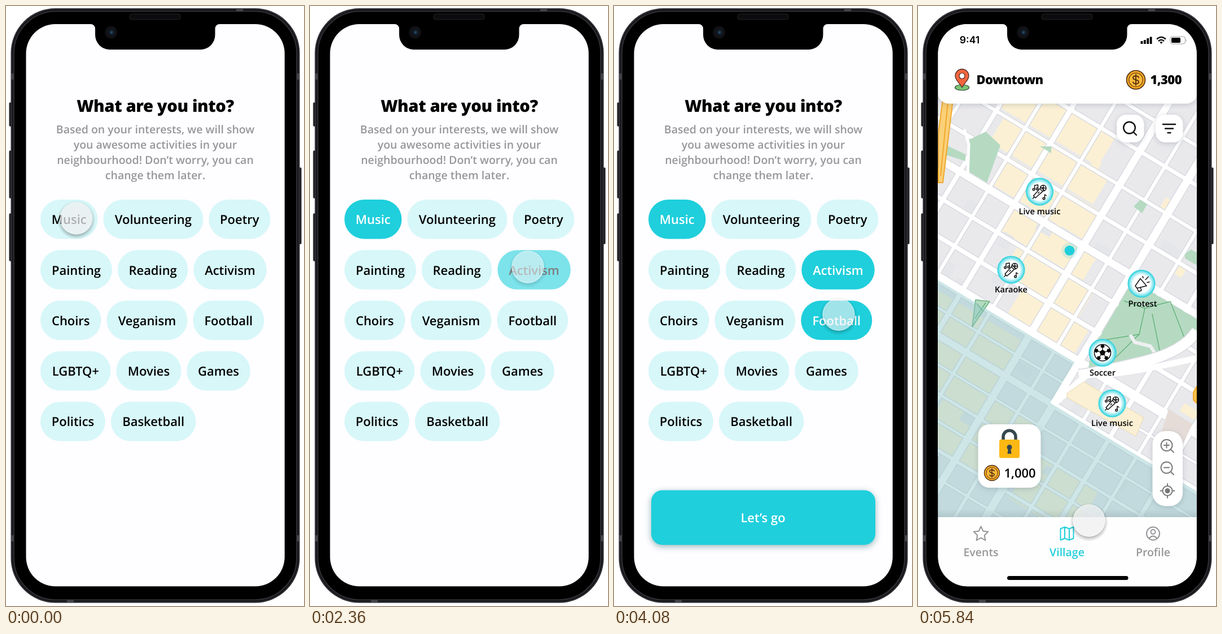
Recreate the animation shown at these times as an HTML page. Size 528 px wide and 1060 px high, loop 5880 ms.

```html
<!DOCTYPE html>
<html lang="en">
<head>
<meta charset="utf-8">
<title>Interests</title>
<style>
html, body { margin: 0; width: 100%; height: 100%; overflow: hidden; background: #fff; }
svg { display: block; width: 528px; height: 1060px; }
text { font-family: "Open Sans", sans-serif; font-weight: 600; font-size: 21.94px; text-rendering: geometricPrecision; }
.mid { text-anchor: middle; }
.title { font-weight: 800; font-size: 29.25px; letter-spacing: -.4px; }
.bold { font-weight: 800; letter-spacing: -.025em; }
.note { font-size: 19.5px; fill: #97979a; }
.tag { font-size: 14.63px; }
.clock { font: 600 17.5px Inter, sans-serif; }
.line { fill: none; stroke: #111; stroke-width: 1.5; stroke-linecap: round; stroke-linejoin: round; }
.card { fill: #fff; filter: drop-shadow(0 2px 5px rgba(60, 70, 90, .22)); }
</style>
</head>
<body>
<svg viewBox="0 0 528 1060" xmlns="http://www.w3.org/2000/svg">
  <defs>
    <clipPath id="screen"><rect x="35.500" y="32" width="458.200" height="993.300" rx="52"/></clipPath>
    <clipPath id="aroundTouch">
      <path clip-rule="evenodd" d="M-50-50H50V50H-50ZM-28.500 0a28.500 28.500 0 0 0 57 0a28.500 28.500 0 0 0-57 0Z"/>
    </clipPath>
    <radialGradient id="touchShade">
      <stop offset=".72" stop-opacity=".34"/>
      <stop offset=".86" stop-opacity=".14"/>
      <stop offset="1" stop-opacity="0"/>
    </radialGradient>
    <radialGradient id="ring">
      <stop offset=".62" stop-color="#fff"/>
      <stop offset=".84" stop-color="#8be6ed"/>
      <stop offset="1" stop-color="#1fcfdc"/>
    </radialGradient>
    <radialGradient id="lens">
      <stop offset="0" stop-color="#3c6c90"/>
      <stop offset=".35" stop-color="#14283a"/>
      <stop offset="1" stop-color="#101115"/>
    </radialGradient>
    <linearGradient id="lift" x1="0" y1="0" x2="0" y2="1">
      <stop offset="0" stop-color="#56646c" stop-opacity="0"/>
      <stop offset="1" stop-color="#56646c" stop-opacity=".16"/>
    </linearGradient>
    <g id="coin">
      <circle r="16.500" fill="#f8a823" stroke="#4a2c12" stroke-width="1.600"/>
      <circle r="12.200" fill="#fbbb3b" stroke="#6d3d10" stroke-width="1.300"/>
      <path class="line" style="stroke:#5d3410;stroke-width:2" d="M5-4C4-8-5-8-5-3.500C-5 1 5-1 5 3.500C5 8-4 8-5 4M0-9.500V9.500"/>
    </g>
    <g id="mic" class="line">
      <g transform="rotate(45)">
        <circle cy="-9" r="5.200"/><path d="M-5-7H5M-3.500-4L-2.500 13H2.500L3.500-4M0 1V4M0 13V17M-3-12L3-7M3-12L-3-7"/>
      </g>
      <path d="M-9-4V-11L-3-12V-5M9 12V5L12 7"/>
      <circle cx="-10.500" cy="-4" r="1.800"/><circle cx="-4.500" cy="-5" r="1.800"/><circle cx="7.500" cy="12" r="1.800"/>
    </g>
    <g id="horn" class="line">
      <path d="M-2-9L9 4L-8 8L-11 4ZM-8 8L-5 14L0 12L-2 7M3-10L2-13M7-7L12-12M10-2L14-3"/>
    </g>
    <g id="ball">
      <circle r="14.500" fill="#fff" stroke="#111" stroke-width="1.600"/>
      <g id="spots"></g>
    </g>
  </defs>

  <g id="body">
    <path fill="#202024" d="M5.500 172q0-2 5-2v43q-5 0-5-2zM5.500 257q0-2 5-2v85q-5 0-5-2zM5.500 368q0-2 5-2v85q-5 0-5-2zM523.500 287q0-2-5-2v136q5 0 5-2z"/>
    <rect x="9.500" y="5" width="510" height="1048.500" rx="78" fill="#17171a" stroke="#303036" stroke-width="2"/>
    <path fill="#45454a" d="M9 119h8v11H9zM512 119h8v11h-8zM9 935h8v11H9zM512 935h8v11h-8zM408 5h12v7h-12zM108 1046h12v8h-12z"/>
    <rect x="14" y="9.500" width="501" height="1039.500" rx="74" fill="#000" stroke="#35353b" stroke-width="1.600"/>
    <rect x="18" y="13" width="493.500" height="1032" rx="70" fill="#000"/>
    <rect x="35.500" y="32" width="458.200" height="993.300" rx="52" fill="#fefdff"/>
  </g>

  <g clip-path="url(#screen)">
    <g id="picker">
      <text class="mid title" x="264.500" y="186.500">What are you into?</text>
      <g id="go" opacity="0">
        <rect x="66" y="855.500" width="397" height="96.500" rx="19.500" fill="#1fcfdc" style="filter:drop-shadow(0 3px 6px rgba(15,95,105,.45))"/>
        <text class="mid" x="264" y="911.500" fill="#fff">Let’s go</text>
      </g>
    </g>

    <g id="home" opacity="0">
      <rect x="35" y="32" width="460" height="994" fill="#e9e9ec"/>
      <g id="streets" transform="translate(283 628) rotate(31)"></g>
      <g id="parks"></g>
      <path transform="translate(283 628) rotate(31)" d="M-600 4H-4V88H500V500H-600Z" fill="#8fc7c9" opacity=".44"/>
      <circle cx="268.500" cy="432" r="14" fill="#1fcfdc" opacity=".16"/>
      <circle cx="268.500" cy="432" r="8.800" fill="#1fcfdc"/>
      <g id="pins"></g>

      <rect class="card" x="35" y="0" width="460" height="172.500" rx="20"/>
      <text class="mid clock" x="91.500" y="66">9:41</text>
      <path d="M394.500 62h3.800v5h-3.800zM399.900 60h3.800v7h-3.800zM405.300 57h3.800v10h-3.800zM410.700 54.500h3.800v12.500h-3.800z"/>
      <path class="line" style="stroke-width:2.400;stroke-linecap:butt" d="M423 58.500q8-7 16 0M426 62q5-4.500 10 0"/>
      <path d="M428.500 64q2.500-2 5 0l-2.500 3z"/>
      <rect x="447" y="54" width="26.500" height="13" rx="4" fill="none" stroke="#999"/>
      <rect x="449" y="56" width="16" height="9" rx="2"/>
      <path d="M475 58.500q2 2 0 4z" fill="#999"/>

      <ellipse cx="78" cy="144" rx="12.500" ry="5" fill="#7cc576" stroke="#2d4a34" stroke-width="1.200"/>
      <path d="M78 144C73 135 66 131 66 123.500A12 12 0 0 1 90 123.500C90 131 83 135 78 144Z" fill="#f2643d" stroke="#4b2a24" stroke-width="1.300"/>
      <circle cx="78" cy="123.500" r="5" fill="#fff" stroke="#4b2a24" stroke-width="1.200"/>
      <text class="bold" x="103.500" y="138">Downtown</text>
      <use href="#coin" x="386" y="130.500"/>
      <text class="bold" x="411.500" y="138">1,300</text>

      <rect class="card" x="352" y="192" width="48.500" height="49" rx="17"/>
      <rect class="card" x="421" y="192" width="48.500" height="49" rx="17"/>
      <path class="line" style="stroke-width:2.400" d="M382 223L387 228M434 209H456M438 216.500H452M442.500 224H447.500"/>
      <circle class="line" style="stroke-width:2.400" cx="374.500" cy="215" r="10.300"/>

      <rect class="card" x="106.500" y="739" width="111" height="112" rx="20"/>
      <path d="M151 768V761A11 11 0 0 1 173 761V768" fill="none" stroke="#36474f" stroke-width="5.500"/>
      <rect x="144" y="766" width="36" height="32.500" rx="3" fill="#fdb813"/>
      <path d="M162 775a4.500 4.500 0 0 1 2.500 8.200l1 7.800h-7l1-7.800A4.500 4.500 0 0 1 162 775z" fill="#36474f"/>
      <use href="#coin" transform="translate(131 825) scale(.82)"/>
      <text x="152.500" y="833">1,000</text>

      <rect class="card" x="415.500" y="751" width="53.500" height="132.500" rx="23"/>
      <g class="line" style="stroke:#77777a;stroke-width:1.900">
        <path d="M436 776H445M440.500 771.500V780.500M447.500 783L453 788.500M436 815.500H445M447.500 822.500L453 828M442 844V848M442 865V869M429.500 856.500H433.500M450.500 856.500H454.500"/>
        <circle cx="440.500" cy="776" r="10"/><circle cx="440.500" cy="815.500" r="10"/><circle cx="442" cy="856.500" r="8.500"/>
        <circle cx="442" cy="856.500" r="3.600" fill="#77777a"/>
      </g>

      <rect x="35" y="889" width="460" height="14" fill="url(#lift)"/>
      <rect x="35" y="903" width="460" height="123" fill="#fefefe"/>
      <g class="line" style="stroke:#949498;stroke-width:2">
        <path id="star"/>
        <circle cx="416.500" cy="932" r="11.500"/><circle cx="416.500" cy="929" r="4"/><path d="M409.500 940.500Q416.500 932.500 423.500 940.500"/>
        <path style="stroke:#1fcfdc" d="M252.500 923.500L260 920.500L268 923.500L275.500 920.500V940.500L268 943.500L260 940.500L252.500 943.500ZM260 920.500V940.500M268 923.500V943.500"/>
      </g>
      <text class="mid note" x="111.500" y="972">Events</text>
      <text class="mid note" x="264" y="972" style="fill:#1fcfdc">Village</text>
      <text class="mid note" x="416.500" y="972">Profile</text>
      <rect x="158" y="1007" width="214.500" height="7" rx="3.500"/>
    </g>

    <g id="touch">
      <g id="rest">
        <g clip-path="url(#aroundTouch)"><circle cy="3" r="34" fill="url(#touchShade)"/></g>
        <circle r="28.500" fill="#efeff0" fill-opacity=".74"/>
        <circle r="28" fill="none" stroke="#fff" stroke-opacity=".55"/>
      </g>
      <circle id="press" r="28" fill="#fff" fill-opacity=".4" stroke="#fff" stroke-opacity=".75" stroke-width="1.400" opacity="0"/>
    </g>
  </g>

  <path d="M150 20V32A8 8 0 0 1 158 40V51A26 26 0 0 0 184 77H344.500A26 26 0 0 0 370.500 51V40A8 8 0 0 1 378.500 32V20Z"/>
  <rect x="219" y="14" width="90" height="10" rx="4" fill="#0c0c0e" stroke="#222226"/>
  <circle cx="186" cy="46.500" r="11" fill="#101115"/>
  <circle cx="187" cy="46.500" r="6.500" fill="url(#lens)"/>
</svg>
<script>
const LOOP = 5880, PALE = '#d7f7f9', TEAL = '#1fcfdc';
const $ = id => document.getElementById(id);

function add(parent, tag, attrs, text) {
  const el = document.createElementNS('http://www.w3.org/2000/svg', tag);
  for (const k in attrs) el.setAttribute(k, attrs[k]);
  if (text) el.textContent = text;
  parent.appendChild(el);
  return el;
}

// steps: [ms, value, easing towards the next step]
function play(el, prop, steps) {
  const all = [[0, steps[0][1]], ...steps, [LOOP, steps[steps.length - 1][1]]];
  el.animate(
    all.map(([ms, v, easing = 'linear']) => ({ offset: ms / LOOP, [prop]: v, easing })),
    { duration: LOOP, iterations: Infinity }
  );
}
const fade = (el, prop, start, from, to, ms = 300) =>
  play(el, prop, [[start, from, 'ease-out'], [start + ms, to]]);

// Interest picker
['Based on your interests, we will show', 'you awesome activities in your',
 'neighbourhood! Don’t worry, you can', 'change them later.'].forEach((s, i) =>
  add($('picker'), 'text', { class: 'mid note', x: 264.5, y: 225 + i * 27 }, s));

const chosen = { Music: 260, Activism: 2260, Football: 3740 };
const rows = [
  [['Music', 101.5], ['Volunteering', 177], ['Poetry', 109]],
  [['Painting', 127], ['Reading', 124.5], ['Activism', 129.5]],
  [['Choirs', 107.5], ['Veganism', 143], ['Football', 126]],
  [['LGBTQ+', 124.5], ['Movies', 115], ['Games', 112.5]],
  [['Politics', 115], ['Basketball', 150.5]]
];
rows.forEach((row, r) => {
  let x = 61;
  const y = 342 + r * 89.3;
  for (const [name, width] of row) {
    const box = add($('picker'), 'rect', { x, y, width, height: 69.5, rx: 34.75, fill: PALE });
    const label = add($('picker'), 'text', { class: 'mid', x: x + width / 2, y: y + 43.2 }, name);
    if (name in chosen) {
      fade(box, 'fill', chosen[name], PALE, TEAL);
      fade(label, 'fill', chosen[name], '#000', '#fff');
    }
    x += width + 9.9;
  }
});

// Street map, drawn on a turned grid
const map = $('streets');
const block = (x, y, width, height, fill = '#fbf0d3') => add(map, 'rect', { x, y, width, height, fill });
for (let k = 0; k < 6; k++) block(-150 - k * 46, -62 - k * 62, 138 + k * 19, 58);
block(-320, 20, 215, 150);
block(-170, 130, 160, 130);
block(20, 180, 130, 90);
let seed = 7;
const rnd = () => (seed = seed * 16807 % 2147483647) / 2147483647;
for (let i = 0; i < 30; i++)
  block(-420 + rnd() * 640, -430 + rnd() * 700, 14 + rnd() * 24, 12 + rnd() * 16, rnd() < .35 ? '#fbf0d3' : '#e5e6e9');

const along = [[-435, 6], [-375, 7], [-305, 6], [-242, 7], [-180, 13], [-122, 7], [-62, 8], [0, 17],
  [46, 4], [88, 12], [132, 4], [176, 5], [218, 4], [262, 6], [305, 4]];
const across = [[-415, 6], [-352, 8], [-292, 6], [-240, 9], [-178, 6], [-97, 13], [-45, 6], [2, 14],
  [62, 6], [118, 8], [176, 6], [236, 8]];
const road = (d, w, color) => add(map, 'path', { d, stroke: color, 'stroke-width': w, fill: 'none' });
for (const [extra, color] of [[3, '#d8dae0'], [0, '#fff']]) {
  for (const [y, w] of along) road(`M-600 ${y}H500`, w + extra, color);
  for (const [x, w] of across) road(`M${x}-600V450`, w + extra, color);
}

const shape = (d, fill, stroke = 'none', w = 1) =>
  add($('parks'), 'path', { d, fill, stroke, 'stroke-width': w, 'stroke-linejoin': 'round' });
const GREEN = '#b5dac1', LEAF = '#65b27b';
shape('M91 236L120 222L146 246L122 312L91 293Z', GREEN);
shape('M50 246L84 262V274L46 262Z', GREEN);
shape('M102 519L127 522L96 567Z', GREEN, LEAF, 1.5);
shape('M104 526L116 540M120 524L101 552', 'none', LEAF, 1.5);
shape('M382 354L394 342L406 350L397 366Z', GREEN);
shape('M216 248H236V260Z', GREEN);
shape('M473 438L484 430L494 436V458L473 446Z', GREEN);
shape('M351 535L372 500L408 502L494 553V574Q475 598 430 610L301 645L307 610Z', GREEN);
shape('M365 521L402 534L447 522M402 534L392 580L345 626M415 544L428 608M447 522L472 586M392 580L330 590', 'none', LEAF, 1.4);
shape('M376 581L384 594L412 601L420 614', 'none', '#eef0f1', 6);
shape('M285 652Q330 645 400 628T494 574', 'none', '#d6d8df', 21);
shape('M285 652Q330 645 400 628T494 574', 'none', '#fff', 18);
shape('M242 702L300 651Q350 655 494 622', 'none', '#fff', 11);
shape('M264 684L294 664L400 727L386 760L264 692Z', '#fbf0d3', '#e4d9b4', 1);
shape('M444 712L486 739L469 775L432 750Z', '#e5dcd8');
shape('M36 312V225L44 165H62L44 312Z', '#fbd078', '#f0a92e', 2);
shape('M40 300L53 170', 'none', '#f0a92e', 2);
shape('M494 672L488 682V696L494 702Z', '#fbc04f', '#f0a92e', 2);
shape('M82 218L90 244L88 300', 'none', '#fff', 5);

// Places
const spin = (n, r, turn = 0) => Array.from({ length: n }, (_, i) => {
  const a = (i / n) * 2 * Math.PI - Math.PI / 2 + turn;
  return [r * Math.cos(a), r * Math.sin(a)];
});
add($('spots'), 'polygon', { points: spin(5, 5.5).join(' ') });
spin(5, 12.5).forEach(([x, y], i) => {
  add($('spots'), 'path', { d: `M0 0L${x} ${y}`, stroke: '#111', 'stroke-width': 1.2 });
  add($('spots'), 'polygon', {
    points: spin(5, 3.8, Math.PI).join(' '),
    transform: `translate(${x * .92} ${y * .92}) rotate(${i * 72})`
  });
});

[['Live music', 215.5, 328, 'mic'], ['Karaoke', 165, 466, 'mic'], ['Protest', 396, 490.5, 'horn', 2],
 ['Soccer', 327, 612.5, 'ball'], ['Live music', 344, 702, 'mic']].forEach(([name, x, y, icon, shift = 0]) => {
  add($('pins'), 'circle', { cx: x, cy: y, r: 24.5, fill: 'url(#ring)' });
  add($('pins'), 'use', { href: '#' + icon, x, y });
  add($('pins'), 'text', { class: 'mid tag', x: x + shift, y: y + 40 }, name);
});

const tips = spin(5, 13.5), dips = spin(5, 6.5, Math.PI / 5);
$('star').setAttribute('d', 'M' + tips.flatMap((p, i) => [p, dips[i]])
  .map(([x, y]) => `${(x + 111.5).toFixed(1)} ${(y + 933).toFixed(1)}`).join('L') + 'Z');

// Motion
fade($('go'), 'opacity', 3740, 0, 1);
fade($('home'), 'opacity', 5430, 0, 1, 320);

const at = (x, y) => `translate(${x}px, ${y}px)`;
const glide = 'cubic-bezier(.45, 0, .3, 1)';
play($('touch'), 'transform', [
  [720, at(124.5, 375), glide], [1240, at(386, 461)],
  [3040, at(386, 461), glide], [3560, at(398, 545)],
  [4320, at(398, 545), glide], [5060, at(303, 909)]
]);

const taps = [[240, 400, 520, 700], [2260, 2460, 2560, 2740], [3680, 3820, 3940, 4120], [5240, 5380, 5520, 5700]];
const pulse = (low, high) => taps.flatMap(([a, b, c, d]) => [[a, low], [b, high], [c, high], [d, low]]);
play($('press'), 'opacity', pulse(0, 1));
play($('rest'), 'opacity', pulse(1, 0));
</script>
</body>
</html>
```
